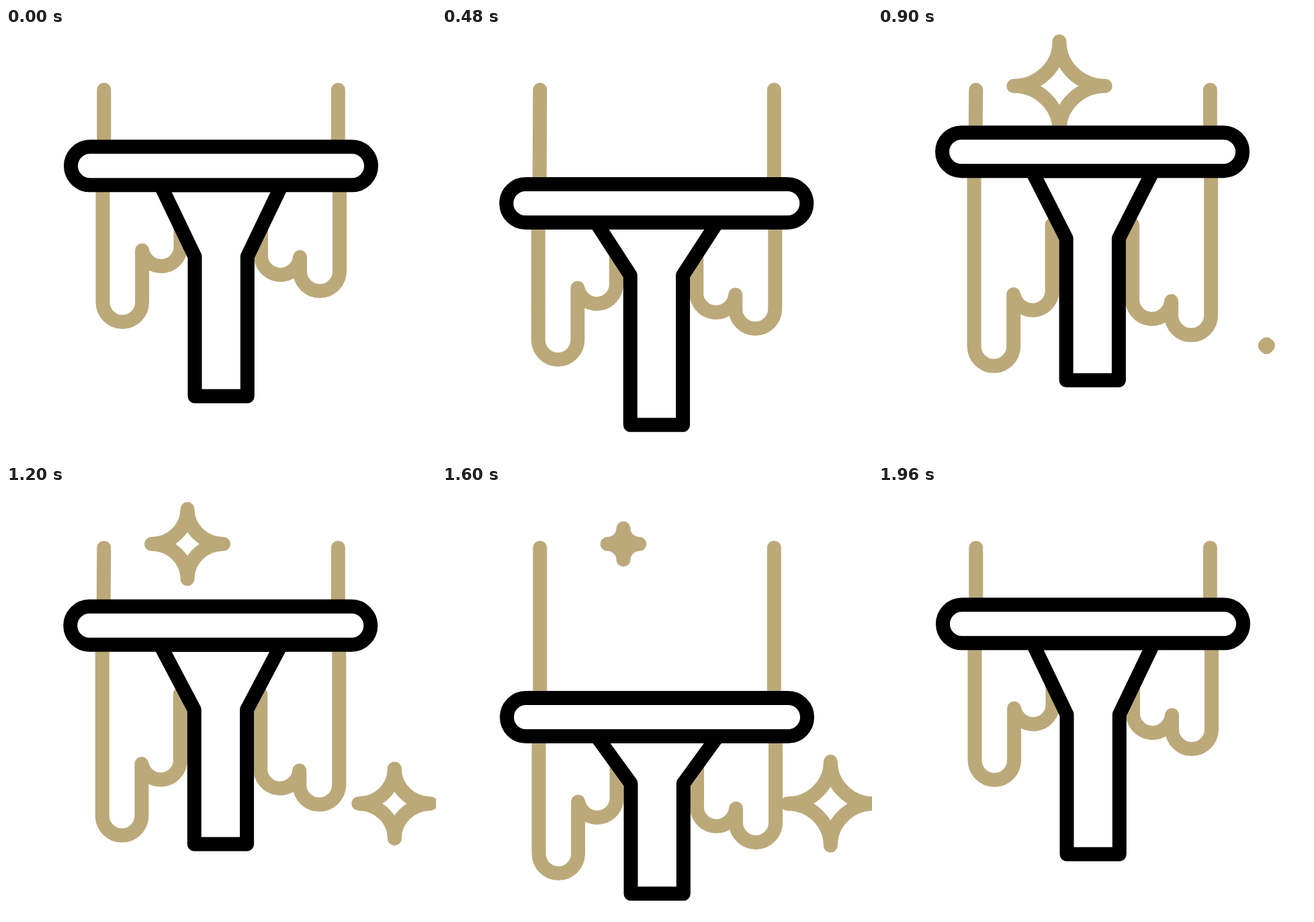
Recreate the animation shown at these times as an HTML page. Size 640 by 640 pixels, loop 2.12 s.

```html
<!DOCTYPE html>
<html lang="en">
<head>
<meta charset="utf-8">
<title>Squeegee</title>
<style>
  html, body { margin: 0; width: 100%; height: 100%; overflow: hidden; background: #fff; }
  svg { display: block; width: 100vw; height: 100vh; }
  path, rect { stroke-width: 21; stroke-linecap: round; stroke-linejoin: round; }
  .gold { fill: none; stroke: #bca97a; }
  .black { fill: #fff; stroke: #000; }
</style>
</head>
<body>
<svg viewBox="0 0 640 640">
  <path id="streaks" class="gold"/>
  <path id="drips" class="gold"/>
  <path id="star1" class="gold"/>
  <path id="star2" class="gold"/>
  <g id="tool">
    <path id="handle" class="black"/>
    <rect id="bar" class="black" x="96.5" width="447" height="57" rx="28.5"/>
  </g>
</svg>
<script>
const LOOP = 2120;
const $ = id => document.getElementById(id);
const draw = (id, d) => $(id).setAttribute('d', d);
const clamp = x => Math.min(1, Math.max(0, x));
const smooth = x => x * x * (3 - 2 * x);
const inOut = (x, n) => x < .5 ? (2 * x) ** n / 2 : 1 - (2 - 2 * x) ** n / 2;

// poses: bar y, shoulder y, handle end y, drip offset, sideways shift
const rest = [205.3, 340, 548, 0, 0];
const low = [273, 374, 600, 68, -.9];
const high = [172.7, 305, 514.5, 65.3, -.9];
const lowest = [365.6, 458.7, 616, 160.5, 0];

// start, end, easing power, pose reached
const moves = [
  [240, 613, 3, low],
  [613, 1028, 3, high],
  [1106, 1421, 2, lowest],
  [1430, 1960, 3, rest]
];

function poseAt(t) {
  let pose = rest;
  for (const [start, end, power, next] of moves) {
    const k = inOut(clamp((t - start) / (end - start)), power);
    pose = pose.map((v, i) => v + (next[i] - v) * k);
  }
  return pose;
}

// time and radius pairs: pop in, settle, swell, vanish
const starKeys = [[702, 0], [868, 69.5], [988, 52], [1356, 52], [1454, 69.5], [1694, 0]];

function starRadius(t) {
  let r = 0;
  starKeys.forEach(([end, next], i) => {
    if (!i) return;
    const start = starKeys[i - 1][0];
    r += (next - r) * smooth(clamp((t - start) / (end - start)));
  });
  return r;
}

function drawStar(id, x, y, r) {
  const w = r * 1.03;
  const arc = (dx, dy) => `a${w} ${r} 0 0 0 ${dx} ${dy}`;
  draw(id, r > .1
    ? `M${x} ${y - r}${arc(w, r)}${arc(-w, r)}${arc(-w, -r)}${arc(w, -r)}z`
    : '');
}

function render(t) {
  const [bar, shoulder, end, drip, dx] = poseAt(t);
  const y = v => v + drip;

  draw('streaks', `M145.8 92L${145.8 + dx} ${bar}M494.3 92V${bar}`);
  draw('drips',
    `M144 ${bar}V${y(408)}a29.3 29.5 0 0 0 58.6 0V${y(331)}` +
    `A29 29 0 0 0 260 ${y(323.5)}V${y(227)}` +
    `M496.5 ${bar}V${y(362)}a29.5 29.5 0 0 1 -59 0V${y(341)}` +
    `A29 29 0 0 1 379.5 ${y(335.5)}V${y(227)}`);
  $('drips').setAttribute('transform', `translate(${dx})`);

  drawStar('star1', 270, 86.3, starRadius(t));
  drawStar('star2', 578.3, 472.7, starRadius(t - (t < 1250 ? 182 : 190)));

  $('bar').setAttribute('y', bar - 28.5);
  draw('handle',
    `M230 ${bar + 28.5}L281 ${shoulder}V${end}H359.3V${shoulder}L410.3 ${bar + 28.5}z`);
  $('tool').setAttribute('transform', `translate(${dx})`);
}

const begin = performance.now();
function tick() {
  render((performance.now() - begin) % LOOP);
  requestAnimationFrame(tick);
}
tick();
</script>
</body>
</html>
```
